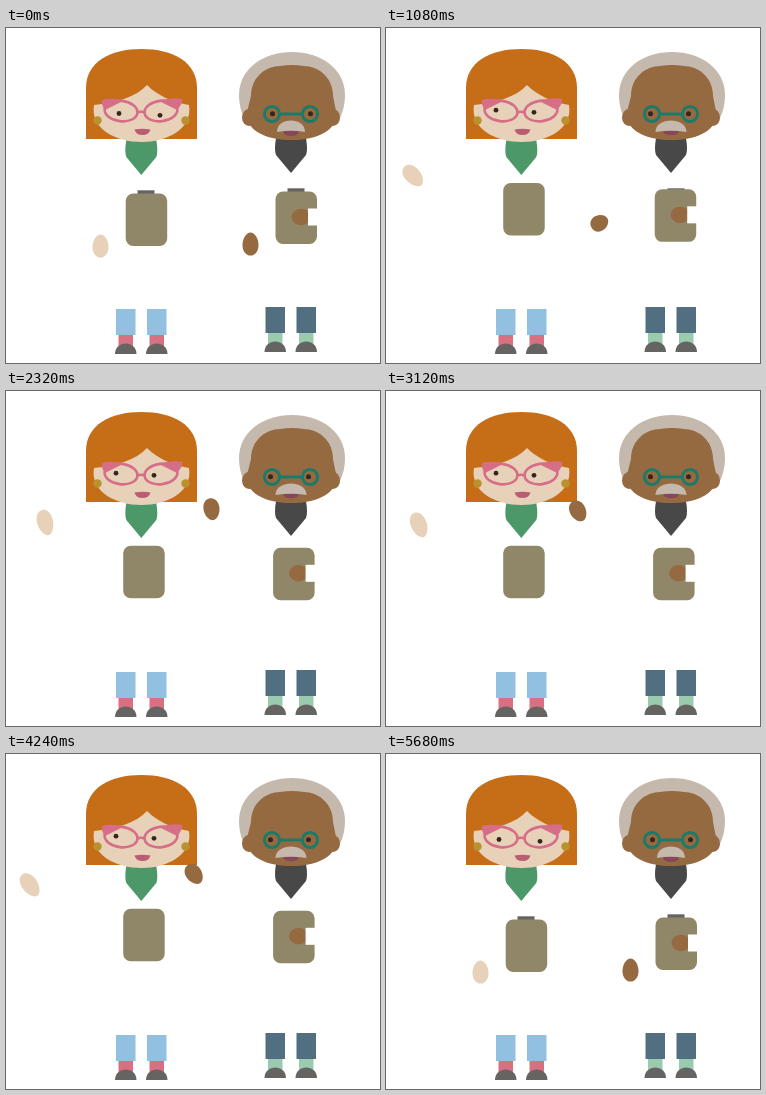
An HTML page with a canvas for the animation above (6000 ms loop, 374x335 px).

```html
<!DOCTYPE html>
<html lang="en">
<head>
<meta charset="utf-8">
<title>Two people waving</title>
<style>
html, body { margin: 0; width: 100%; height: 100%; overflow: hidden; background: #fff; }
canvas { display: block; width: 374px; height: 335px; }
</style>
</head>
<body>
<canvas id="stage" width="374" height="335"></canvas>
<script>
const ctx = document.getElementById("stage").getContext("2d");
const LOOP = 6000, STEP = 40;
const SKIN = "#e8d1b9", BROWN = "#966a41", GREY = "#c5b9ae", OLIVE = "#908668", DARK = "#666463";

// Hand poses: time, x, y, pointing angle (0 = up), length
const womanHand = [
  [240, 94.5, 218, -180, 23],
  [440, 81, 210, -158, 22],
  [680, 53, 183, -97, 21],
  [840, 40, 167, -70, 22],
  [1060, 27, 149, -45, 25],
  [1280, 31, 138, -25, 26],
  [1520, 44, 132, -9, 26],
  [1940, 60, 129, 14, 26],
  [2360, 37, 132, -18, 26],
  [2780, 17, 143, -50, 26],
  [3120, 33, 134, -22, 26],
  [3620, 60, 129, 14, 26],
  [4240, 24, 131, -35, 26],
  [4450, 17, 142, -50, 26],
  [4720, 31, 161, -62, 23],
  [4880, 47, 174, -70, 22],
  [5120, 75, 203, -130, 22],
  [5360, 94.5, 218, -180, 23]
];
const manHand = [
  [700, 244.5, 216, -180, 23],
  [840, 236, 212, -165, 22],
  [1160, 205, 188, -105, 18],
  [1340, 184, 170, -70, 18],
  [1520, 175, 150, -42, 21],
  [1760, 178, 130, -38, 22],
  [2120, 192, 120, -26, 22],
  [2400, 208, 118, -5, 22],
  [2960, 187, 121, -32, 22],
  [3120, 192, 120, -27, 22],
  [3570, 221, 118, 10, 22],
  [4040, 193, 120, -26, 22],
  [4240, 188, 120, -35, 22],
  [4440, 181, 131, -45, 22],
  [4680, 185, 157, -65, 19],
  [4880, 203, 183, -80, 16],
  [5100, 228, 207, -140, 20],
  [5320, 244.5, 216, -180, 23]
];

// Smooth interpolation that never overshoots a key
function sample(keys, t) {
  const last = keys.length - 1;
  if (t <= keys[0][0]) return keys[0].slice(1);
  if (t >= keys[last][0]) return keys[last].slice(1);
  let i = 0;
  while (keys[i + 1][0] <= t) i++;
  const span = keys[i + 1][0] - keys[i][0], u = (t - keys[i][0]) / span;
  const slope = (k, c) => (keys[k + 1][c] - keys[k][c]) / (keys[k + 1][0] - keys[k][0]);
  const tangent = (k, c) => {
    if (k === 0 || k === last) return 0;
    const a = slope(k - 1, c), b = slope(k, c);
    return a * b > 0 ? 2 * a * b / (a + b) : 0;
  };
  return [1, 2, 3, 4].map(c => {
    const p = keys[i][c], q = keys[i + 1][c];
    return p + (q - p) * u * u * (3 - 2 * u) +
      span * u * (1 - u) * (tangent(i, c) * (1 - u) - tangent(i + 1, c) * u);
  });
}

function ease(t, from, to) {
  const u = Math.min(1, Math.max(0, (t - from) / (to - from)));
  return u * u * (3 - 2 * u);
}
const pulse = (t, a, b, c, d) => ease(t, a, b) - ease(t, c, d);

function fill(color, d) {
  ctx.fillStyle = color;
  ctx.fill(new Path2D(d));
}
function stroke(color, width, d) {
  ctx.strokeStyle = color;
  ctx.lineWidth = width;
  ctx.stroke(new Path2D(d));
}
function rect(color, x, y, w, h) {
  ctx.fillStyle = color;
  ctx.fillRect(x, y, w, h);
}
function oval(color, x, y, rx, ry = rx, turn = 0) {
  ctx.beginPath();
  ctx.ellipse(x, y, rx, ry, turn, 0, Math.PI * 2);
  ctx.fillStyle = color;
  ctx.fill();
}
function ring(color, width, x, y, rx, ry, turn = 0) {
  ctx.beginPath();
  ctx.ellipse(x, y, rx, ry, turn, 0, Math.PI * 2);
  ctx.strokeStyle = color;
  ctx.lineWidth = width;
  ctx.stroke();
}

function hand(color, [x, y, angle, length]) {
  const h = length / 2, w = 8;
  ctx.save();
  ctx.translate(x, y);
  ctx.rotate(angle * Math.PI / 180);
  fill(color, `M0 ${-h}C${w * .6} ${-h} ${w} ${-h * .6} ${w} ${-h * .1}` +
    `C${w} ${h * .5} ${w * .5} ${h} 0 ${h}C${-w * .5} ${h} ${-w} ${h * .5} ${-w} ${-h * .1}` +
    `C${-w} ${-h * .6} ${-w * .6} ${-h} 0 ${-h}Z`);
  ctx.restore();
}

function body(x, y) {
  ctx.beginPath();
  ctx.roundRect(x, y, 41.5, 52.5, 7.5);
  ctx.fillStyle = OLIVE;
  ctx.fill();
}

function scarf(color, x, y) {
  fill(color, `M${x - 15} ${y}H${x + 15}Q${x + 17} ${y + 12} ${x + 15} ${y + 17}` +
    `L${x} ${y + 35}L${x - 15} ${y + 17}Q${x - 17} ${y + 12} ${x - 15} ${y}Z`);
}

function legs(x, y, pants, socks) {
  for (const left of [x, x + 31]) {
    rect(socks, left + 2.5, y + 26, 14.5, 12);
    rect(pants, left, y, 19.5, 26);
    const sole = y + 45;
    fill(DARK, `M${left - 1} ${sole}C${left - 1} ${sole - 14} ${left + 20.5} ${sole - 14} ${left + 20.5} ${sole}Z`);
  }
}

function woman(t) {
  const look = pulse(t, 580, 900, 5320, 5680);
  const lift = pulse(t, 540, 1120, 4960, 5360);
  const pink = "#d66e87";

  scarf("#4c9868", 135.3, 112);
  fill("#c66d18", "M80 111V60C80 34 104 21 135.5 21S191 34 191 60V111Z");
  fill(SKIN, "M141 57C152 68 166 74 183 77C187 101 161 114 135.5 114S84 101 88 77C110 75 130 69 141 57Z");
  oval("#b9922f", 91.5, 92.5, 4.2);
  oval("#b9922f", 179.5, 92.5, 4.2);
  oval("#35251d", 113 - 3 * look, 85.5 - 3.3 * look, 2.4);
  oval("#35251d", 154 - 6 * look, 87.3 - 3 * look, 2.4);
  ring(pink, 2.6, 115, 83, 16.5, 10.2, .13);
  ring(pink, 2.6, 155, 83, 16.5, 10.2, -.13);
  fill(pink, "M96 72Q106 69 117 73L99 82Q95 77 96 72Z");
  fill(pink, "M176.500 71Q165 69 153 73L171 82Q176 77 176.500 71Z");
  stroke(pink, 2.4, "M131 85Q135 82.500 139 85");
  fill("#ba5d73", "M128.500 101.500Q136.500 100 144.500 101.500Q143 107 136.500 107T128.500 101.500Z");

  rect(DARK, 131.5, 162.3, 17, 6);
  body(119.7 - 2.5 * lift, 165.5 - 10.7 * lift);
  legs(110, 281, "#92c0e0", "#d77181");
}

function man(t) {
  const look = pulse(t, 560, 880, 5320, 5680);
  const lips = pulse(t, 400, 680, 5360, 5680);
  const lift = pulse(t, 860, 1440, 4640, 5240);
  const teal = "#1e7a68";

  scarf("#484848", 285, 110);
  fill(GREY, "M242 97C236 88 233 78 233 67C233 41 257 24 286 24S339 41 339 67C339 78 336 88 330 97Z");
  oval(BROWN, 243, 89.5, 7, 8.5);
  oval(BROWN, 327, 89.5, 7, 8.5);
  fill(BROWN, "M245 68C245 49 260 38 274 38Q286 36 298 38C312 38 327 49 327 68L331 88C328 104 309 112 285.500 112S243 104 240 88Z");
  oval("#35251d", 266.5 - 2 * look, 85.8, 2.5);
  oval("#35251d", 304.5 - 2 * look, 85.8, 2.5);
  ring(teal, 3, 266, 86, 7.6, 7.6);
  ring(teal, 3, 304, 86, 7.6, 7.6);
  stroke(teal, 3, "M274 86H296");
  oval("#86475c", 285, 104.3, 7.5, 3.8 - .9 * lips);
  const w = 14 + 1.5 * lips;
  fill(GREY, `M${285 - w} 104C${285 - w} 96 278 92.500 285 92.500S${285 + w} 96 ${285 + w} 104Q285 101.500 ${285 - w} 104Z`);

  rect(DARK, 281.5, 160.3, 17, 6);
  const x = -2.4 * lift, y = -6.7 * lift;
  body(269.5 + x, 163.5 + y);
  oval(BROWN, 295 + x, 189 + y, 9.5, 8.2);
  rect("#fff", 302 + x, 180.5 + y, 11, 17);
  legs(259.5, 279, "#526f82", "#9acbae");
}

function draw(now) {
  const t = Math.floor((now % LOOP) / STEP) * STEP;
  ctx.fillStyle = "#fff";
  ctx.fillRect(0, 0, 374, 335);
  woman(t);
  man(t);
  hand(SKIN, sample(womanHand, t));
  hand(BROWN, sample(manHand, t));
}

let start;
function tick(now) {
  start ??= now;
  draw(now - start);
  requestAnimationFrame(tick);
}
draw(0);
requestAnimationFrame(tick);
</script>
</body>
</html>
```
